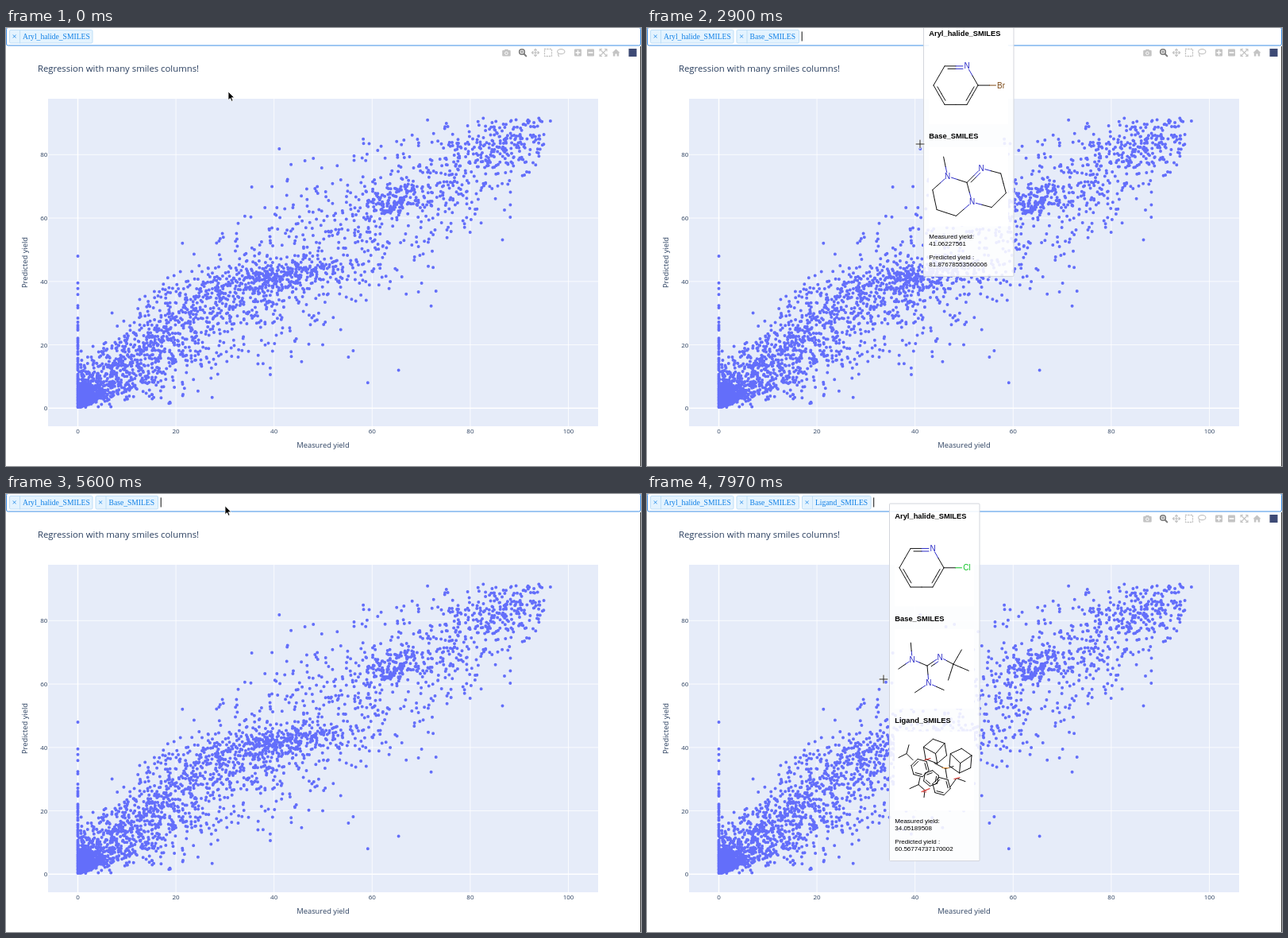
Write an HTML page that moves like this. It is 800 by 551 pixels and loops after 8000 ms.

```html
<!DOCTYPE html>
<html lang="en">
<head>
<meta charset="utf-8">
<title>Regression scatter with molecule tooltips</title>
<style>
html, body { margin: 0; width: 100%; height: 100%; overflow: hidden; background: #fff; }
svg { display: block; position: absolute; left: 0; top: 0; }
text { white-space: pre; }
.plot { font-family: "Open Sans", "DejaVu Sans", sans-serif; fill: #2a3f5f; }
.form { font-family: "Liberation Serif", "Times New Roman", serif; }
.tip { font-family: "Liberation Sans", Arial, sans-serif; font-size: 8px; }
.line { fill: none; stroke-linecap: round; stroke-linejoin: round; }
</style>
</head>
<body>
<svg id="stage" width="800" height="551" viewBox="0 0 800 551"></svg>
<script>
const LOOP = 8000;
const stage = document.getElementById('stage');
const sx = v => 90.5 + v * 6.18;
const sy = v => 478.3 - v * 3.987;

const rect = (x, y, w, h, fill, more = '') =>
  `<rect x="${x}" y="${y}" width="${w}" height="${h}" fill="${fill}" ${more}/>`;
const text = (x, y, s, more = '') => `<text x="${x}" y="${y}" ${more}>${s}</text>`;
const path = (d, color, w = 1, more = '') =>
  `<path class="line" d="${d}" stroke="${color}" stroke-width="${w}" ${more}/>`;
const ring = (x, y, r, color, w) =>
  `<circle cx="${x}" cy="${y}" r="${r}" fill="none" stroke="${color}" stroke-width="${w}"/>`;
const group = (id, body, more = '') => `<g id="${id}" ${more}>${body}</g>`;

// ---- scatter, in yield units ----
let seed = 20417;
function rnd() {
  seed = (seed + 0x6D2B79F5) | 0;
  let r = Math.imul(seed ^ (seed >>> 15), 1 | seed);
  r = (r + Math.imul(r ^ (r >>> 7), 61 | r)) ^ r;
  return ((r ^ (r >>> 14)) >>> 0) / 4294967296;
}
const bell = () => (rnd() + rnd() + rnd() - 1.5) * 2;
const decay = () => -Math.log(1 - rnd());
const times = (n, fn) => { for (let i = 0; i < n; i++) fn(); };

// count, measured, predicted, their spreads, slope
const clusters = [
  [230, 15, 18, 5, 7, .5],
  [170, 30, 36, 7, 4.5, .3],
  [230, 43, 42, 6, 2, .25],
  [130, 65, 66, 4, 2.2, .2],
  [110, 85, 83, 5, 4, .4]
];
function scatter() {
  let d = '';
  const dot = (m, p) => {
    if (m >= 0 && m <= 100 && p > .3 && p < 92) d += `M${sx(m).toFixed(1)} ${sy(p).toFixed(1)}h0`;
  };
  const trend = m => 5 + .88 * m;
  const spread = m => 3.5 + 9 * Math.sin(Math.PI * m / 100);
  times(450, () => { const m = decay() * 3; dot(m, m * .5 + decay() * 3); });
  times(110, () => dot(0, Math.min(48, decay() * 13)));
  times(1450, () => { const m = 95 * rnd() ** 1.4; dot(m, trend(m) + bell() * spread(m)); });
  times(130, () => { const m = 95 * rnd(); dot(m, trend(m) + bell() * 2 * spread(m)); });
  for (const [n, m, p, wm, wp, k] of clusters) {
    times(n, () => { const q = bell() * wm; dot(m + q, p + k * q + bell() * wp); });
  }
  for (const tip of tips) dot(tip[3], +tip[4]);
  return path(d, '#636efa', 4);
}

function chart() {
  let s = rect(53, 89, 693, 412, '#e6ecf9');
  for (let v = 0; v <= 100; v += 20) {
    s += path(`M${sx(v)} 89V501`, '#fff', v ? .8 : 1.4);
    s += text(sx(v), 509.5, v, 'text-anchor="middle" font-size="8"');
    if (v === 100) continue;
    s += path(`M53 ${sy(v)}H746`, '#fff', v ? .8 : 1.4);
    s += text(52.3, sy(v) + 3, v, 'text-anchor="end" font-size="8"');
  }
  const title = 'text-anchor="middle" font-size="9.33"';
  s += text(40, 55, 'Regression with many smiles columns!', 'font-size="11.33"');
  s += text(399.5, 528.3, 'Measured yield', title);
  s += text(0, 0, 'Predicted yield', title + ' transform="translate(26.5 295) rotate(-90)"');
  return `<g class="plot">${s}</g>` + scatter();
}

// Each icon is drawn around its own centre.
function modebar() {
  const g = '#c4c4c4', dark = '#7a7a7a';
  const at = (x, body) => `<g transform="translate(${x} 31)">${body}</g>`;
  const key = rect(-4.5, -4.5, 9, 9, g, 'rx="1"');
  const turned = d => [0, 90, 180, 270].map(a => path(d, g, 1.1, `transform="rotate(${a})"`)).join('');
  return at(630.2, rect(-5, -3, 10.5, 7.5, g, 'rx="1"') + rect(-2, -4.2, 4.5, 3, g) + ring(.2, .7, 1.8, '#fff', 1)) +
    at(650.5, ring(-.5, -1, 3.3, dark, 1.6) + path('M2 1.5L4.8 4.4', dark, 2) + path('M-2-1h3M-.5-2.5v3', dark, .9)) +
    at(667, turned('M0 0V-4.6M-1.5-3L0-4.6L1.5-3')) +
    at(683, path('M-4.5-4.5h9v9h-9z', g, 1.3, 'stroke-dasharray="1.3 2"')) +
    at(699.3, `<ellipse cy="-1.3" rx="4.6" ry="3" fill="none" stroke="${g}" stroke-width="1.2"/>` + path('M-3.3 1q-1 2 .5 3.5', g, 1.2)) +
    at(720.5, key + path('M-2.5 0h5M0-2.5v5', '#fff', 1.4)) +
    at(736.5, key + path('M-2.5 0h5', '#fff', 1.4)) +
    at(752.5, turned('M0 0L3.5 3.5M4.5 2v2.5h-2.5')) +
    at(768.5, `<path d="M-5 .2L0-4.5l5 4.7h-1.3v4.3h-2.6v-3h-2.2v3h-2.6v-4.3z" fill="${g}"/>`) +
    at(789.5, rect(-5, -5, 10, 10, '#3d4a75'));
}

// ---- select box ----
const names = ['Aryl_halide_SMILES', 'Base_SMILES', 'Ligand_SMILES'];
const tagX = [4, 112.5, 195, 285.5];
const tag = (name, i) => {
  const x = tagX[i];
  return group('tag' + i,
    rect(x + .5, 2.5, tagX[i + 1] - x - 4, 16.5, '#e4f3fe', 'rx="1.5" stroke="#bfdff8"') +
    path(`M${x + 13.5} 3V19`, '#bfdff8') +
    `<g fill="#1080e6">${text(x + 6.7, 13.9, '×', 'text-anchor="middle" font-size="11"')}` +
    `${text(x + 17, 13.6, name, 'font-size="9.6"')}</g>`);
};

const ROW = 23.2;
const menu = (id, items) => group(id,
  rect(.5, 22.5, 799, items.length * ROW, '#fff', 'stroke="#cfd4d8"') +
  rect(1, 23, 798, 22.5, '#e1f2fe', `id="${id}Hit"`) +
  items.map((n, i) => text(6, 37.6 + i * ROW, n, 'font-size="10.67"')).join(''));

// ---- molecules, grown bond by bond at given angles ----
const hues = { C: '#111', N: '#2b2bc8', Br: '#7f4c19', Cl: '#10c428' };
function molecule(x, y, first, build) {
  const atoms = [[first, x, y]];
  let lines = '';
  const join = (i, j, order = 1) => {
    const [e, x1, y1] = atoms[i], [f, x2, y2] = atoms[j];
    const len = Math.hypot(x2 - x1, y2 - y1), ux = (x2 - x1) / len, uy = (y2 - y1) / len;
    for (let k = 0; k < order; k++) {
      const off = k * 3.4, cut = k * 4;
      const p = q => `${(x1 + ux * q - uy * off).toFixed(1)} ${(y1 + uy * q + ux * off).toFixed(1)}`;
      const gap = a => a === 'C' ? cut : a === 'N' ? 5 : 6.5;
      lines += path(`M${p(gap(e))}L${p(len / 2)}`, hues[e]) +
        path(`M${p(len / 2)}L${p(len - gap(f))}`, hues[f]);
    }
  };
  const add = (from, deg, len, el = 'C', order = 1) => {
    const a = deg * Math.PI / 180, [, px, py] = atoms[from];
    atoms.push([el, px + len * Math.cos(a), py + len * Math.sin(a)]);
    join(from, atoms.length - 1, order);
    return atoms.length - 1;
  };
  build(add, join);
  return lines + atoms.filter(a => a[0] !== 'C').map(([e, ax, ay]) =>
    text(ax.toFixed(1), (ay + 3.5).toFixed(1), e, `text-anchor="middle" font-size="10" fill="${hues[e]}"`)).join('');
}
const aryl = halogen => molecule(-2, -23, 'N', (add, join) => {
  for (let i = 0; i < 5; i++) add(i, 60 + i * 60, 28, 'C', 1 + i % 2);
  join(5, 0, 2);
  add(1, 0, 29, halogen);
});
const bicycle = () => molecule(-2, -5, 'C', (add, join) => {
  let a = 0;
  [...'NCCCN'].forEach((el, i) => { a = add(a, -45 + i * 60, 25.5, el, i ? 1 : 2); });
  join(a, 0);
  let b = 0;
  [...'NCCC'].forEach((el, i) => { b = add(b, 198 - i * 60, 25.5, el); });
  join(b, a);
  add(a + 1, 258, 25);
});
const guanidine = () => molecule(-9, -4, 'C', add => {
  const fan = (from, ...angles) => angles.forEach(a => add(from, a, 21));
  fan(add(0, 203, 20.5, 'N'), 265, 145);
  fan(add(0, 85, 22, 'N'), 146, 24);
  fan(add(add(0, -34, 19.5, 'N', 2), 28, 19), -60, 23, 108);
});
function hexagon(x, y, r, turn, inner) {
  const at = (k, q) => {
    const a = (k * 60 + turn) * Math.PI / 180;
    return `${(x + q * Math.cos(a)).toFixed(1)} ${(y + q * Math.sin(a)).toFixed(1)}`;
  };
  let d = '';
  for (let k = 0; k < 6; k++) {
    d += `M${at(k, r)}L${at(k + 1, r)}`;
    if (k % 2) d += inner === 'cage' ? `M${at(k, r)}L${at(1, 3)}` : `M${at(k, r - 3)}L${at(k + 1, r - 3)}`;
  }
  return path(d, '#111');
}
const phosphine = () =>
  hexagon(-18, -4, 11.5, 15) + hexagon(9, 19, 11.5, 15) + hexagon(-4, 9, 10, 40) +
  hexagon(1, -25, 15.5, 20, 'cage') + hexagon(33, -13, 15.5, 35, 'cage') +
  path('M-45-17L-35-22L-32-33M-35-22L-27-14M-31 22L-20 17L-12 24L-13 33M-20 17L-18 8M0-10L14-3L24-6M14-3L16 9M20 20L28 9L39 13', '#111') +
  path('M-16 26L-6 22M25 10L32 8M-12-14L-5-16', '#d94b45', 1.2) +
  path('M10-4L18-4', '#e59a4a', 1.4) +
  text(-12, 27, 'O', 'font-size="6" text-anchor="middle" fill="#d93030"');

// ---- tooltips: loading, ready and gone times, data point, drawings ----
const tips = [
  [2600, 2790, 3280, 41.06227561, '81.87678553560006', aryl('Br'), bicycle()],
  [3410, 3560, 3950, 43.46318294, '76.89160427310004', aryl('Cl'), bicycle()],
  [4010, 4130, 4500, 39.58720416, '69.95218640770003', aryl('Br'), guanidine()],
  [4510, 4640, 4640, 39.58720416, '69.95218640770003'],
  [4660, 4715, 4850, 45.56108327, '66.98513027940001', aryl('Cl'), bicycle()],
  [7650, 7830, 8000, 34.05189508, '60.56774737170002', aryl('Cl'), guanidine(), phosphine()]
];
function tooltip([, , , mx, my, ...mols], i) {
  const x = Math.round(sx(mx)) + 4, y = sy(+my);
  const end = mols.length * 128.5, h = end + 65;
  const values = [['Measured yield:', 17], [mx, 26], ['Predicted yield :', 43], [my, 52]];
  const card = rect(.5, .5, 113.5, h - 1, '#fff', 'fill-opacity=".88" stroke="#d3d6dc" rx="1"') +
    mols.map((m, k) => `<g transform="translate(0 ${k * 128.5})">` + rect(7, 30, 100, 100, '#fff') +
      text(7.3, 19.5, names[k], 'font-size="9.33" font-weight="bold"') +
      `<g transform="translate(57 80)">${m}</g></g>`).join('') +
    values.map(([v, dy]) => text(7.3, end + dy, v)).join('');
  const wait = rect(.5, .5, 57, 18.5, '#fff', 'stroke="#d3d6dc" rx="1"') +
    text(6.3, 13.3, 'Loading...', 'font-size="10.67"');
  const place = top => `transform="translate(${x} ${top.toFixed(1)})"`;
  return group('tip' + i, card, 'class="tip" ' + place(y - h / 2)) +
    group('wait' + i, wait, 'class="form" ' + place(y - 9.7));
}

// ---- pointer: arrives, leaves, x, y ----
const rests = [
  [0, 40, 280, 80], [520, 830, 271, 13], [1230, 1250, 264, 45.5], [1470, 1720, 266, 56],
  [2430, 2440, 300, 86], [2600, 3270, 344, 146], [3410, 3930, 360, 168], [4010, 4600, 343, 206],
  [4680, 4830, 374, 213], [5650, 6000, 275, 13], [6330, 6660, 284, 64],
  [7570, 7600, 293, 224], [7780, LOOP, 298, 233]
];
function pointerAt(t) {
  const i = rests.findIndex(r => t <= r[1]);
  const [t1, , x1, y1] = rests[i];
  if (t >= t1) return [x1, y1];
  const [, t0, x0, y0] = rests[i - 1];
  const u = (t - t0) / (t1 - t0), k = u * u * (3 - 2 * u);
  return [x0 + (x1 - x0) * k, y0 + (y1 - y0) * k];
}

stage.innerHTML =
  chart() + group('modebar', modebar()) + rect(799, 23, 1, 528, '#3c3c3c') +
  '<g class="form">' + rect(.5, -.5, 799, 22.5, '#fff', 'id="box" rx="2"') +
  names.map(tag).join('') + rect(0, 4.5, 1, 12, '#111', 'id="caret"') +
  menu('menuA', ['Additive_SMILES', 'Base_SMILES', 'Ligand_SMILES']) +
  menu('menuB', ['Additive_SMILES', 'Ligand_SMILES']) + '</g>' +
  tips.map(tooltip).join('') +
  group('arrow', '<path d="M0 0V10.6L2.5 8.4L4.2 12.2L6 11.4L4.3 7.7H7.7Z" fill="#000" stroke="#fff" stroke-width=".8"/>') +
  group('cross', path('M-5 0H5M0-5V5', '#fff', 2.4) + path('M-5 0H5M0-5V5', '#222', 1));

const el = id => document.getElementById(id);
const show = (id, on) => { el(id).style.display = on ? '' : 'none'; };

// Each phase: end, when its menu opens, start of the caret blink.
const phases = [[1720, 650, 630], [6650, 5700, 530], [LOOP, LOOP, 6900]];

function draw(t) {
  const [x, y] = pointerAt(t);
  const n = phases.findIndex(p => t < p[0]);
  const [, opens, blink] = phases[n];
  const open = t >= opens;
  const inPlot = !open && y > 89;

  names.forEach((_, i) => show('tag' + i, i <= n));
  ['menuA', 'menuB'].forEach((id, i) => {
    show(id, open && i === n);
    el(id + 'Hit').setAttribute('y', y < 46 ? 23 : 23 + ROW);
  });
  el('box').setAttribute('stroke', open ? '#a9cdec' : '#3f8fe6');
  show('modebar', !open && y > 23);
  show('caret', t >= blink && (t - blink) % 1000 < 500);
  el('caret').setAttribute('x', tagX[n + 1] - .3);

  tips.forEach(([wait, ready, gone], i) => {
    show('wait' + i, t >= wait && t < ready);
    show('tip' + i, t >= ready && t < gone);
  });
  show('cross', inPlot);
  show('arrow', !inPlot);
  el(inPlot ? 'cross' : 'arrow').setAttribute('transform', `translate(${x.toFixed(1)} ${y.toFixed(1)})`);
}

const start = performance.now();
function tick() {
  draw((performance.now() - start) % LOOP);
  requestAnimationFrame(tick);
}
tick();
</script>
</body>
</html>
```
